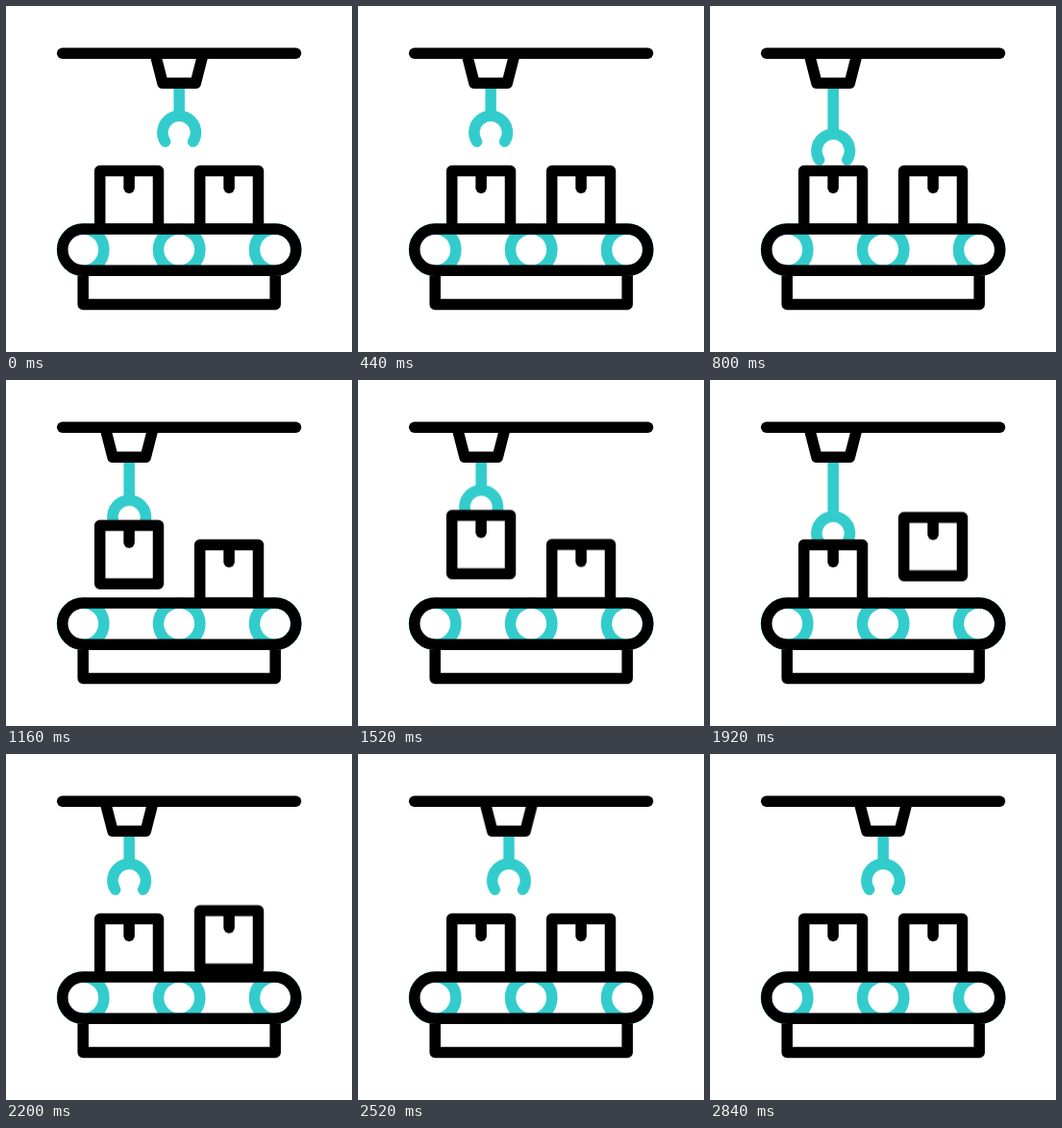
Animation of 360 by 360 pixels, one loop 3 s. Source, as an HTML page without scripts:

```html
<!DOCTYPE html>
<html lang="en">
<head>
<meta charset="utf-8">
<title>Conveyor and claw</title>
<style>
  html, body { margin: 0; width: 100%; height: 100%; overflow: hidden; background: #fff; }
  svg { display: block; width: 100vw; height: 100vh; }
  .ink, .teal { stroke-width: 11.5; stroke-linecap: round; stroke-linejoin: round; }
  .ink { stroke: #000; fill: #fff; }
  .teal { stroke: #33cccc; fill: none; }
  .open { fill: none; }

  .trolley, .arm, .held, .hop {
    animation: 3s cubic-bezier(.333, 0, .667, 1) infinite;
  }
  .trolley { animation-name: travel; }
  .arm { animation-name: reach; }
  .held { animation-name: lift; }
  .hop { animation-name: hop; }

  @keyframes travel {
    0%, 1%, 93.333%, 100% { transform: translateX(0); }
    20%, 73.333% { transform: translateX(-52px); }
  }
  @keyframes reach {
    0%, 20%, 43.333%, 50%, 73.333%, 100% { transform: translateY(0); }
    31.667%, 61.667% { transform: translateY(31px); }
  }
  @keyframes lift {
    0%, 31.667%, 61.667%, 100% { transform: translateY(0); }
    43.333%, 50% { transform: translateY(-31px); }
  }
  @keyframes hop {
    0%, 50%, 77%, 100% { transform: translateY(0); }
    60%, 67% { transform: translateY(-28.5px); }
  }
</style>
</head>
<body>
<svg viewBox="0 0 360 360">
  <defs>
    <g id="box">
      <rect x="97.7" y="171.5" width="60.8" height="60.8"/>
      <path d="M128.1 172V189.2"/>
    </g>
    <circle id="roller" cy="253.6" r="21.7"/>
  </defs>

  <g class="trolley">
    <g class="arm teal">
      <path d="M180.2 56V114" stroke-linecap="butt"/>
      <path d="M165.7 141.1A17.3 17.3 0 1 1 194.7 141.1"/>
    </g>
    <path class="ink" d="M155.5 51L163 80.2H197.3L204.8 51"/>
  </g>
  <path class="ink" d="M58.7 49.3H301.5"/>

  <g class="held ink"><use href="#box"/></g>
  <g class="hop ink"><use href="#box" x="104"/></g>

  <path class="ink" d="M80.2 275V310.4H280.2V275"/>
  <rect x="58.7" y="232" width="243" height="43.2" rx="21.6" fill="#fff"/>
  <g class="teal">
    <use href="#roller" x="80.2"/>
    <use href="#roller" x="180.2"/>
    <use href="#roller" x="280.2"/>
  </g>
  <rect class="ink open" x="58.7" y="232" width="243" height="43.2" rx="21.6"/>
</svg>
</body>
</html>
```
